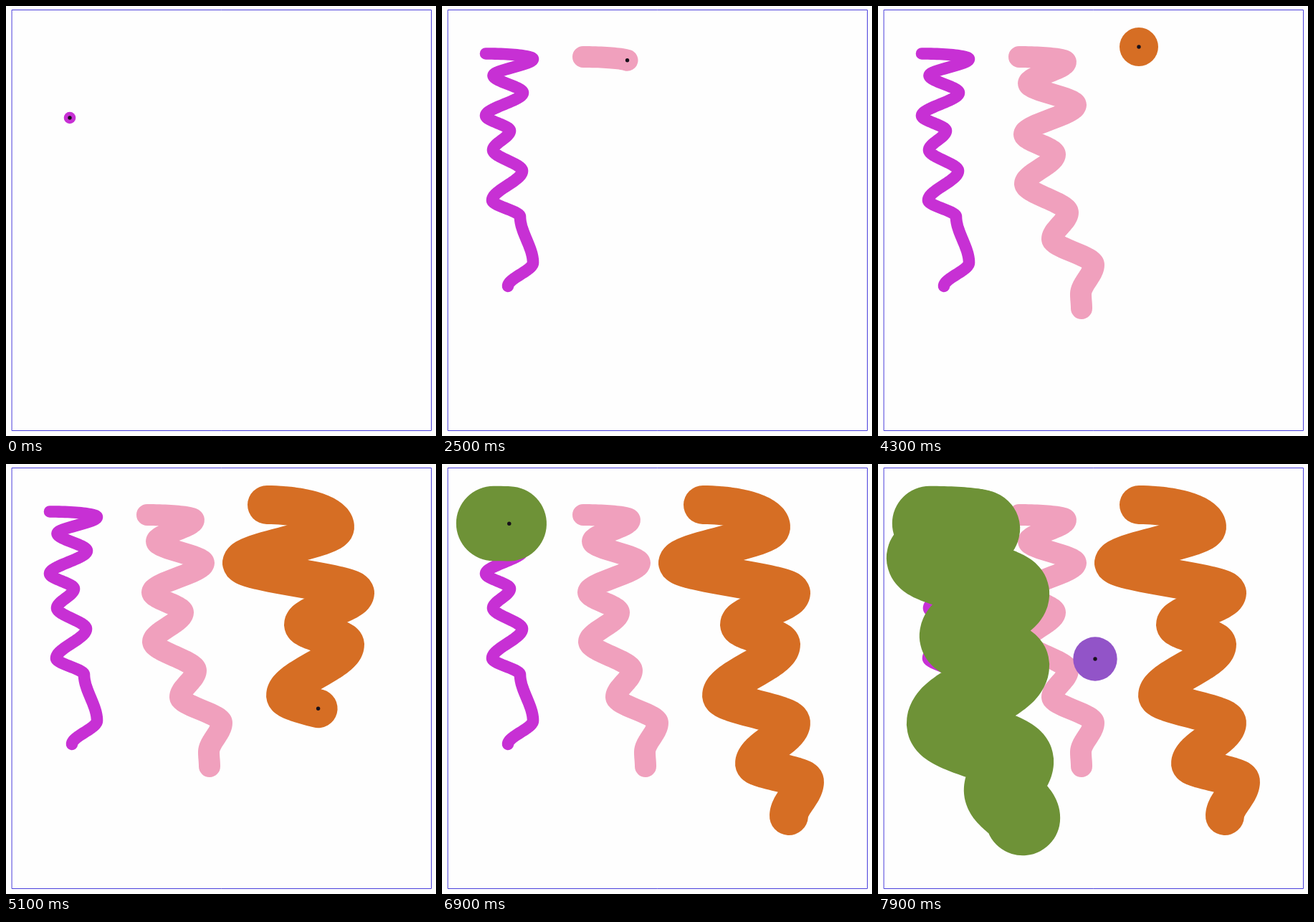
Recreate the animation shown at these times as an HTML page with a canvas. Size 600 px wide and 600 px high, loop 8 s.

```html
<!DOCTYPE html>
<html lang="en">
<head>
<meta charset="utf-8">
<title>Brush strokes</title>
<style>
html, body { margin: 0; width: 100%; height: 100%; overflow: hidden; background: #fefefe; }
canvas { display: block; }
</style>
</head>
<body>
<canvas id="stage" width="600" height="600"></canvas>
<script>
const LOOP = 8000, STEP = 100, DETAIL = 24;
const ctx = document.getElementById('stage').getContext('2d');

// hover: [time, x, y] on the way to the stroke
// pace: [time, turns done]; turns: the corners of the zigzag
const brushes = [
  {
    color: '#c730d4', r: 8.3,
    hover: [[0, 89, 156]],
    pace: [[400, 0], [1500, 6.38], [1950, 11]],
    turns: '61,66.5 127,74 71.5,97 113,121 61,153 95,174 71,201 112,230 70,271 109,294 127,358 92,391'
  },
  {
    color: '#f0a0bd', r: 15,
    hover: [[2100, 79, 300]],
    pace: [[2400, 0], [3500, 8.7], [3700, 11]],
    turns: '197,71 262,78 210,108 276,138 204,179 247,207 205,248 265,288 243,325 301,361 283,402 284,422'
  },
  {
    color: '#d66e24', r: 27,
    hover: [[3800, 284, 425]],
    pace: [[4300, 0], [5100, 6.48], [5450, 10]],
    turns: '364,57 459,88 329,138 487,180 415,224 473,252 390,323 487,361 436,418 506,443 484,491'
  },
  {
    color: '#6e9237', r: 52.2,
    hover: [[5600, 507, 497], [6000, 364, 293.5], [6370, 118, 84]],
    pace: [[6800, 0], [6900, 0.19], [7700, 9]],
    turns: '72,83 146,90 64,131 187,181 110,240 187,281 92,362 193,415 172,455 202,494'
  },
  { color: '#9254c8', r: 30.7, hover: [[7800, 245, 400], [7900, 303, 272]] }
];

for (const b of brushes) {
  if (!b.turns) continue;
  b.turns = b.turns.split(' ').map(p => p.split(',').map(Number));
  b.hover.push([b.pace[0][0], ...b.turns[0]]);
}

// Linear lookup in rows of [time, ...values]
function lookup(rows, t) {
  const i = rows.findIndex(row => row[0] >= t);
  if (i < 0) return rows[rows.length - 1].slice(1);
  if (i === 0) return rows[0].slice(1);
  const a = rows[i - 1], b = rows[i], f = (t - a[0]) / (b[0] - a[0]);
  return a.slice(1).map((v, j) => v + (b[j + 1] - v) * f);
}

// A quarter ellipse into the first turn, then a wave from turn to turn
function pointAt(turns, pos) {
  const i = Math.min(Math.floor(pos), turns.length - 2), u = pos - i;
  const [x0, y0] = turns[i], [x1, y1] = turns[i + 1];
  const angle = u * Math.PI / 2;
  const [fx, fy] = i === 0
    ? [Math.sin(angle), 1 - Math.cos(angle)]
    : [u * u * (3 - 2 * u), u];
  return [x0 + (x1 - x0) * fx, y0 + (y1 - y0) * fy];
}

function dot([x, y], r, color) {
  ctx.fillStyle = color;
  ctx.beginPath();
  ctx.arc(x, y, r, 0, 2 * Math.PI);
  ctx.fill();
}

function drawBrush({ color, r, hover, pace, turns }, t) {
  if (!turns || t <= pace[0][0]) {
    const tip = lookup(hover, t);
    dot(tip, r, color);
    return tip;
  }
  const [reach] = lookup(pace, t);
  const tip = pointAt(turns, reach);
  ctx.strokeStyle = color;
  ctx.lineWidth = 2 * r;
  ctx.beginPath();
  for (let k = 0; k < reach * DETAIL; k++) ctx.lineTo(...pointAt(turns, k / DETAIL));
  ctx.lineTo(...tip);
  ctx.stroke();
  return tip;
}

function draw() {
  const t = Math.floor(performance.now() % LOOP / STEP) * STEP;
  ctx.fillStyle = '#fefefe';
  ctx.fillRect(0, 0, 600, 600);
  ctx.lineCap = ctx.lineJoin = 'round';
  let tip;
  for (const b of brushes) if (t >= b.hover[0][0]) tip = drawBrush(b, t);
  dot(tip, 2.7, '#17101a');
  ctx.strokeStyle = '#4a3fdc';
  ctx.lineWidth = 1;
  ctx.strokeRect(8.5, 5.5, 585, 587);
  requestAnimationFrame(draw);
}
draw();
</script>
</body>
</html>
```
